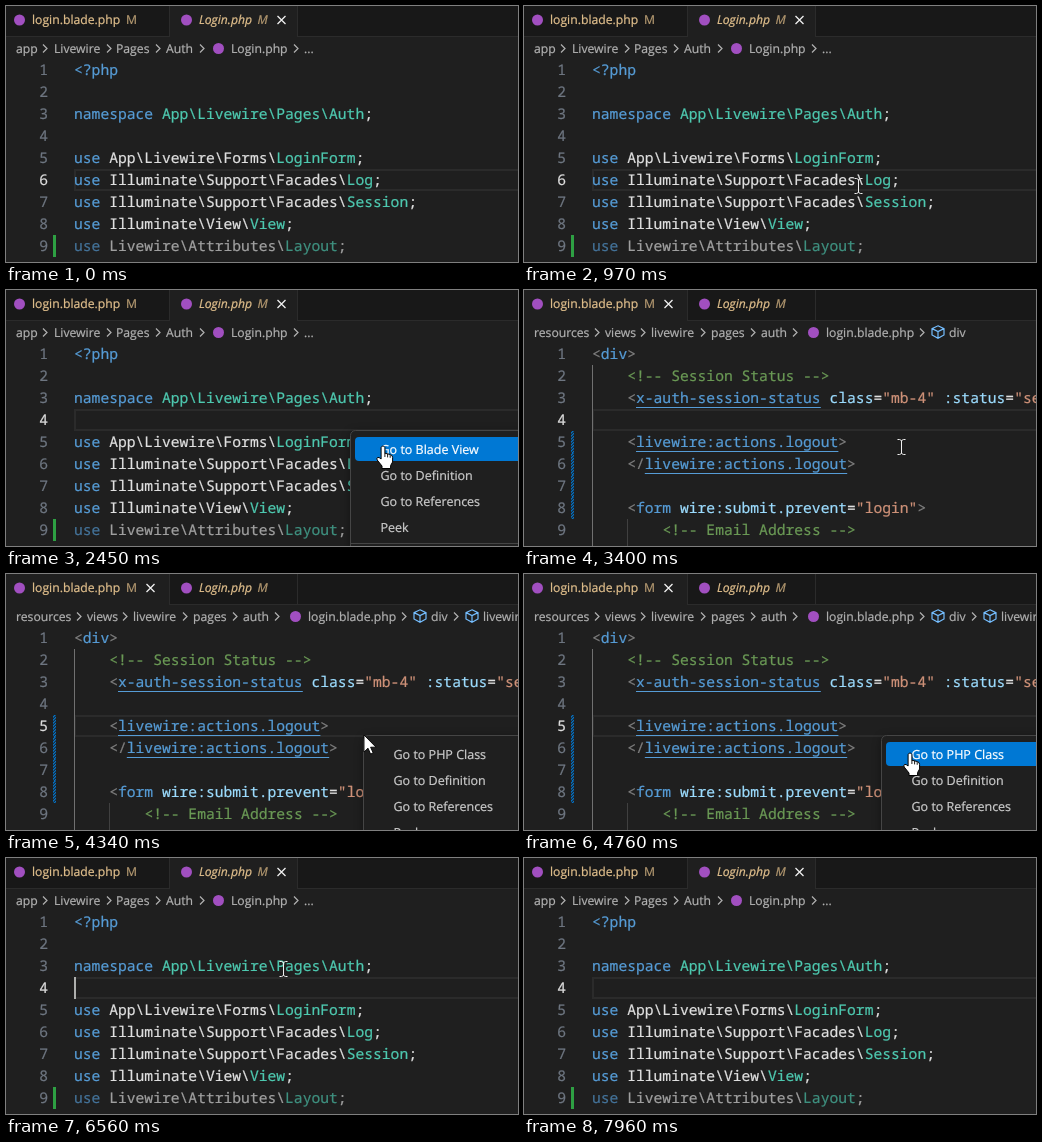
Animation of 512x256 px, one loop 8.09 s. Source, as an HTML page:

```html
<!DOCTYPE html>
<html lang="en">
<head>
<meta charset="utf-8">
<title>Editor navigation</title>
<style>
html, body { margin: 0; width: 100%; height: 100%; overflow: hidden; background: #1f1f1f; }
svg { display: block; width: 512px; height: 256px; }
text { white-space: pre; text-rendering: geometricPrecision; stroke-width: .22px; }
.code { font: 14.667px 'Noto Sans Mono', monospace; }
.ui { font: 12.2px 'Open Sans', sans-serif; }
.menu { font-size: 12.5px; }
.it { font-style: italic; }
</style>
</head>
<body>
<svg id="stage" viewBox="0 0 512 256">
  <defs>
    <pattern id="stripes" x="47" width="3" height="3" patternUnits="userSpaceOnUse">
      <path d="M-1 3.25L3.25 -1M1.25 4L4 1.25" stroke="#0078d4" stroke-width="1.2"/>
    </pattern>
  </defs>
</svg>
<script>
const LOOP = 8090, CHAR = 8.8, LEFT = 68, ROW = 22, TOP = 53;
const stage = document.getElementById('stage');
const COLORS = {
  key: '#569cd6', type: '#4ec9b0', text: '#e0e0e0', mark: '#808080',
  note: '#6a9955', attr: '#9cdcfe', str: '#ce9178', link: '#569cd6'
};

function add(parent, tag, attrs = {}, content) {
  const node = document.createElementNS('http://www.w3.org/2000/svg', tag);
  for (const name in attrs) node.setAttribute(name, attrs[name]);
  if (content !== undefined) node.textContent = content;
  parent.append(node);
  return node;
}
const group = (parent, attrs) => add(parent, 'g', attrs);
const rect = (parent, x, y, width, height, fill, more) =>
  add(parent, 'rect', { x, y, width, height, fill, ...more });
const path = (parent, d, color, width = 1) =>
  add(parent, 'path', { d, fill: 'none', stroke: color, 'stroke-width': width });
const show = (node, on) => node.setAttribute('visibility', on ? 'inherit' : 'hidden');
const place = (node, x, y) => node.setAttribute('transform', `translate(${x} ${y})`);
const rowTop = n => TOP + (n - 1) * ROW;

// Glyphs get a hairline outline of their own colour for a firmer weight.
function ink(node, color) {
  node.setAttribute('fill', color);
  node.setAttribute('stroke', color);
  return node;
}
const label = (parent, x, y, text, color, cls = '') =>
  ink(add(parent, 'text', { x, y, class: 'ui ' + cls }, text), color);

const badge = (parent, x, y) => add(parent, 'circle', { cx: x, cy: y, r: 5.5, fill: '#a14fc0' });

function cube(parent, x) {
  path(parent, `M${x} 35.8L${x + 6} 38.6V45L${x} 48.2L${x - 6} 45V38.6Z` +
    `M${x - 6} 38.6L${x} 41.6L${x + 6} 38.6M${x} 41.6V48`, '#75beff', 1.2);
}

function tabs(parent, active) {
  rect(parent, 0, 0, 512, 31, '#181818');
  rect(parent, 0, 30, 512, 1, '#2b2b2b');
  const [x, width] = active ? [164, 127] : [0, 163];
  rect(parent, x, 0, width, 31, '#1f1f1f');
  rect(parent, 163, 0, 1, 31, '#2b2b2b');
  rect(parent, 291, 0, 1, 31, '#2b2b2b');
  badge(parent, 13.5, 14);
  badge(parent, 180.5, 14);
  const tan = '#e2c08d', dim = '#b59a71';
  label(parent, 26, 18, 'login.blade.php', tan);
  label(parent, 120, 18, 'M', dim);
  label(parent, 193, 18, 'Login.php', tan, 'it');
  label(parent, 251.5, 18, 'M', dim, 'it');
  const cx = active ? 275.5 : 144.5;
  path(parent, `M${cx - 4} 10L${cx + 4} 18M${cx + 4} 10L${cx - 4} 18`, '#f0f0f0', 1.3);
}

function crumbs(parent, items, chevrons) {
  for (const [x, text] of items) label(parent, x, 46.5, text, '#b2b2b2');
  for (const x of chevrons) path(parent, `M${x - 2} 38.5L${x + 2} 42.5L${x - 2} 46.5`, '#b2b2b2', 1.2);
}

// Tokens alternate between a colour name and its text.
function line(parent, n, indent, ...tokens) {
  const y = rowTop(n) + 16, x = LEFT + indent * CHAR;
  const text = add(parent, 'text', { x, y, class: 'code' });
  let col = 0;
  for (let i = 0; i < tokens.length; i += 2) {
    const [kind, word] = [tokens[i], tokens[i + 1]];
    ink(add(text, 'tspan', {}, word), COLORS[kind]);
    if (kind === 'link') rect(parent, x + col * CHAR, y + 4, word.length * CHAR, 1, COLORS.link);
    col += word.length;
  }
  return text;
}

// Class view
rect(stage, 0, 0, 512, 256, '#1f1f1f');
const band = rect(stage, LEFT + 1, 1, 460, ROW - 2, 'none', { stroke: '#2b2b2b', 'stroke-width': 2 });

const classView = group(stage);
tabs(classView, 1);
crumbs(classView, [[10, 'app'], [48, 'Livewire'], [110, 'Pages'], [160, 'Auth'],
  [225, 'Login.php'], [298, '...']], [39, 103, 152, 196, 290]);
badge(classView, 212.5, 42.5);
line(classView, 1, 0, 'key', '<?php');
line(classView, 3, 0, 'key', 'namespace ', 'type', 'App\\Livewire\\Pages\\Auth', 'text', ';');
[['App\\Livewire\\Forms\\', 'LoginForm'], ['Illuminate\\Support\\Facades\\', 'Log'],
  ['Illuminate\\Support\\Facades\\', 'Session'], ['Illuminate\\View\\', 'View'],
  ['Livewire\\Attributes\\', 'Layout']].forEach(([space, name], i) => {
  const row = line(classView, 5 + i, 0, 'key', 'use ', 'text', space, 'type', name, 'text', ';');
  if (i === 4) row.setAttribute('opacity', 0.667);
});
rect(classView, 47, rowTop(9), 3, ROW, '#2ea043');

// Blade view
const bladeView = group(stage);
tabs(bladeView, 0);
crumbs(bladeView, [[10, 'resources'], [81, 'views'], [127, 'livewire'], [187, 'pages'],
  [237, 'auth'], [302, 'login.blade.php'], [425, 'div']], [73, 119, 179, 229, 271, 398]);
badge(bladeView, 289.5, 42.5);
cube(bladeView, 414);
const crumbTail = group(bladeView);
crumbs(crumbTail, [[477, 'livewire:actions.logout']], [450]);
cube(crumbTail, 466);
rect(bladeView, LEFT, rowTop(2), 1, 181, '#707070');
rect(bladeView, 103, rowTop(9), 1, 27, '#404040');
line(bladeView, 1, 0, 'mark', '<', 'key', 'div', 'mark', '>');
line(bladeView, 2, 4, 'note', '<!-- Session Status -->');
line(bladeView, 3, 4, 'mark', '<', 'link', 'x-auth-session-status', 'attr', ' class', 'text', '=',
  'str', '"mb-4"', 'attr', ' :status', 'text', '=', 'str', '"session');
line(bladeView, 5, 4, 'mark', '<', 'link', 'livewire:actions.logout', 'mark', '>');
line(bladeView, 6, 4, 'mark', '</', 'link', 'livewire:actions.logout', 'mark', '>');
line(bladeView, 8, 4, 'mark', '<', 'key', 'form', 'attr', ' wire:submit.prevent', 'text', '=',
  'str', '"login"', 'mark', '>');
line(bladeView, 9, 8, 'note', '<!-- Email Address -->');
for (let n = 5; n <= 8; n++) place(rect(bladeView, 47, 0, 3, ROW, 'url(#stripes)'), 0, rowTop(n));

const numbers = Array.from({ length: 9 }, (_, i) =>
  add(stage, 'text', { x: 33.2, y: rowTop(i + 1) + 16, class: 'code' }, i + 1));
const caret = rect(stage, LEFT, rowTop(4), 2, ROW, '#aeafad');

// Context menu
const menu = group(stage);
rect(menu, 0.5, 0.5, 220, 200, '#1f1f1f', {
  rx: 5, stroke: '#454545', style: 'filter:drop-shadow(0 2px 4px rgba(0,0,0,.36))'
});
rect(menu, 1, 113, 219, 1, '#454545');
const hover = rect(menu, 5, 7, 211, 24, '#0078d4', { rx: 4 });
const entries = ['', 'Go to Definition', 'Go to References', 'Peek'].map((text, i) =>
  label(menu, 30.5, 24 + 26 * i, text, '#cccccc', 'menu'));

// Pointers, each with its hot spot at the origin
const beam = path(stage, 'M-3.5-7.5H-1.5L.5-6.5L2.5-7.5H4.5M.5-6.5V6.5M-3.5 7.5H-1.5L.5 6.5L2.5 7.5H4.5', '#f0f0f0');
const arrow = add(stage, 'path', {
  d: 'M0 0V17L4 13.2L6.6 19L9.2 18L6.6 12.2H12Z', fill: '#fff', stroke: '#000', 'stroke-width': 0.9
});
const hand = group(stage);
add(hand, 'path', {
  d: 'M-1.9 12V.8C-1.9-1.4 1.9-1.4 1.9.8V6.2L7.5 7.6Q9.6 8.3 9.6 10.5V15L7.6 18.5V21.5H-1V19L-5.8 13Q-7 10.8-5 10.4Q-3.6 10.4-1.9 12Z',
  fill: '#fff', stroke: '#000'
});
path(hand, 'M1.9 6V10M4.6 7V10.4M7.2 8V10.8', '#000', 0.9);

// Pointer keys: time, x, y, number of steps taken to get there
const KEYS = [
  [430, 323, 220, 1], [1250, 345, 140, 6], [1930, 345, 140, 1], [2450, 377, 157, 4],
  [3540, 377, 157, 1], [3820, 358, 161, 2], [4220, 358, 161, 1], [4760, 386, 180, 4],
  [5885, 386, 179, 1], [6560, 277, 111, 5], [6710, 271, 108, 1], [6960, 288, 121, 2],
  [6970, 288, 121, 1], [7522, 397, 232, 4]
];
const ease = k => k * k * (3 - 2 * k);

function pointerAt(t) {
  const i = KEYS.findIndex(key => key[0] > t);
  if (i === 0) return KEYS[0].slice(1, 3);
  if (i < 0) return KEYS[KEYS.length - 1].slice(1, 3);
  const [t0, x0, y0] = KEYS[i - 1], [t1, x1, y1, steps] = KEYS[i];
  const k = ease(Math.floor((t - t0) / (t1 - t0) * steps) / steps);
  return [Math.round(x0 + (x1 - x0) * k), Math.round(y0 + (y1 - y0) * k)];
}

const within = (t, ...spans) => spans.some(([a, b]) => t >= a && t < b);

function draw(t) {
  const blade = within(t, [2980, 5590]);
  show(bladeView, blade);
  show(classView, !blade);
  crumbTail.style.display = t >= 4220 ? '' : 'none';

  const active = blade ? (t < 4220 ? 4 : 5) : (t < 1810 ? 6 : 4);
  place(band, 0, rowTop(active));
  numbers.forEach((n, i) => ink(n, i + 1 === active ? '#dddddd' : '#6e7681'));
  show(caret, within(t, [2980, 3400], [3820, 4220], [5590, 6020], [6425, 6960], [7385, 7960]));

  const first = within(t, [1810, 2850]), open = first || within(t, [4220, 5470]);
  const [mx, my] = first ? [344, 140] : [357, 161];
  const [x, y] = pointerAt(t);
  const over = open && x > mx + 5 && y > my + 4;
  show(menu, open);
  place(menu, mx, my);
  show(hover, over);
  entries[0].textContent = first ? 'Go to Blade View' : 'Go to PHP Class';
  ink(entries[0], over ? '#ffffff' : '#cccccc');

  show(beam, within(t, [430, 7660]) && !open);
  show(arrow, open && !over);
  show(hand, over);
  for (const node of [beam, arrow, hand]) place(node, x, y);
}

function tick() {
  draw(performance.now() % LOOP);
  requestAnimationFrame(tick);
}
tick();
</script>
</body>
</html>
```
